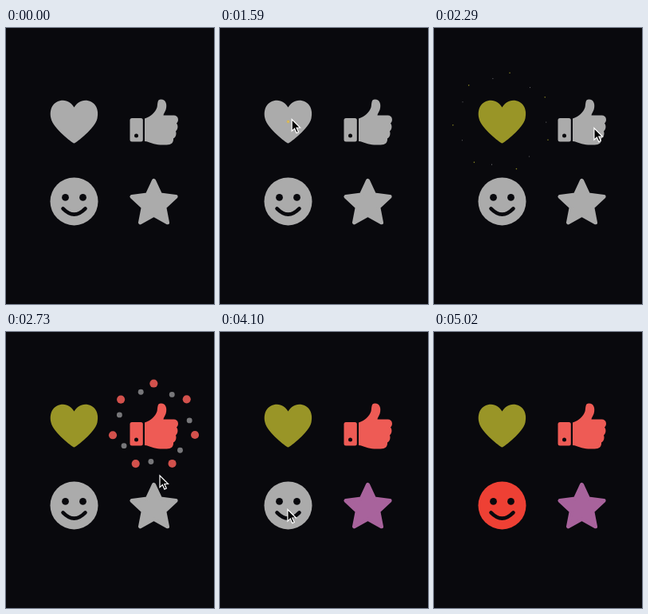
Recreate the animation shown at these times as an HTML page with a canvas. Size 261x346 px, loop 5.4 s.

```html
<!DOCTYPE html>
<html lang="en">
<head>
<meta charset="utf-8">
<title>Reaction icons</title>
<style>
  html, body { margin: 0; width: 100%; height: 100%; overflow: hidden; background: #09090d; }
  canvas { display: block; width: 261px; height: 346px; }
</style>
</head>
<body>
<canvas id="stage"></canvas>
<script>
const W = 261, H = 346, LOOP = 5400, BURST = 835;
const BG = '#09090d', GRAY = '#ababab', TAU = Math.PI * 2;

const canvas = document.getElementById('stage');
const ctx = canvas.getContext('2d');
const dpr = window.devicePixelRatio || 1;
canvas.width = Math.round(W * dpr);
canvas.height = Math.round(H * dpr);

const clamp = v => Math.max(0, Math.min(1, v));
const ramp = (t, from, to) => clamp((t - from) / (to - from));
const easeOut = p => 1 - (1 - p) * (1 - p);

const heartPath = new Path2D('M0 27.2C-3 26-26 8.5-29 -4C-32 -17-25 -26.7-14 -26.7C-8 -26.7-3 -23 0 -18C3 -23 8 -26.7 14 -26.7C25 -26.7 32 -17 29 -4C26 8.5 3 26 0 27.2Z');
const handPath = new Path2D('M-11.5 -4C-4 -6 2 -12 4 -18C5 -23 4 -28 9 -28C15 -28 17 -22 15 -15C14 -12 12 -10 12 -8L25 -8C31 -8 32 -1 28.5 2C31 5 30 10 27.5 12C29 16 27 20 24.5 21C25 26 22 29 16 29L8 29C0 29-5 25-11.5 24.5Z');
const smilePath = new Path2D('M-14 9Q0 23.5 14 9');
const arrowPath = new Path2D('M.5 .5V15.2L3.9 12L6.4 17.6L8.8 16.5L6.4 11H11Z');

const starPath = new Path2D();
for (let i = 0; i < 10; i++) {
  const r = i % 2 ? 14 : 29, a = -Math.PI / 2 + i * Math.PI / 5;
  starPath.lineTo(r * Math.cos(a), 3 + r * Math.sin(a));
}
starPath.closePath();

function dot(x, y, r, color) {
  ctx.fillStyle = color;
  ctx.beginPath();
  ctx.arc(x, y, r, 0, TAU);
  ctx.fill();
}

function drawHeart(color) {
  ctx.fillStyle = color;
  ctx.fill(heartPath);
}

function drawThumb(color) {
  ctx.fillStyle = color;
  ctx.beginPath();
  ctx.roundRect(-30, -4.5, 16.3, 29.5, 2.5);
  ctx.fill();
  ctx.fill(handPath);
  dot(-22, 17.5, 2.5, BG);
}

function drawSmiley(color) {
  dot(0, 0, 30, color);
  dot(-11, -5, 4.4, BG);
  dot(11, -5, 4.4, BG);
  ctx.strokeStyle = BG;
  ctx.lineWidth = 4.6;
  ctx.lineCap = 'round';
  ctx.stroke(smilePath);
}

function drawStar(color) {
  ctx.fillStyle = ctx.strokeStyle = color;
  ctx.lineWidth = 5;
  ctx.lineJoin = 'round';
  ctx.fill(starPath);
  ctx.stroke(starPath);
}

const icons = [
  { x: 85.5, y: 117.4, click: 1590, color: '#999527', draw: drawHeart },
  { x: 185.5, y: 117.4, click: 2420, color: '#ee5b55', draw: drawThumb },
  { x: 185.5, y: 217.4, click: 3260, color: '#a8639c', draw: drawStar },
  { x: 85.5, y: 217.4, click: 4185, color: '#ee4034', draw: drawSmiley }
];

function drawDisc(age) {
  const size = easeOut(ramp(age, 0, 85));
  ctx.globalAlpha = 1 - ramp(age, 103, 248);
  dot(0, 0, 45 * size, '#fff');
  ctx.strokeStyle = '#d6b450';
  ctx.lineWidth = 1.5;
  ctx.stroke();
  ctx.globalAlpha = 1;
}

// Two rings of seven dots drift outward, turn and shrink.
function drawSparks(age, color) {
  const p = easeOut(ramp(age, 150, BURST));
  const alpha = ramp(age, 100, 225);
  for (let i = 0; i < 7; i++) {
    const turn = (16.5 * p + i * 360 / 7) * Math.PI / 180;
    const big = turn - 97 * Math.PI / 180;
    const small = turn - 118 * Math.PI / 180;
    const R = 46 + 16.5 * p, r = 37.5 + 18.5 * p;
    ctx.globalAlpha = alpha * 0.88;
    dot(R * Math.cos(big), R * Math.sin(big), 7.8 * (1 - p) + 0.5, color);
    ctx.globalAlpha = alpha * 0.45;
    dot(r * Math.cos(small), r * Math.sin(small), 5.3 * (1 - p) + 0.35, '#fff');
  }
  ctx.globalAlpha = 1;
}

function drawIcon(icon, t) {
  const age = t - icon.click;
  ctx.save();
  ctx.translate(icon.x, icon.y);
  if (age < 85) {
    icon.draw(GRAY);
  } else {
    const s = clamp(age / 205);
    ctx.save();
    ctx.scale(s, s);
    icon.draw(icon.color);
    ctx.restore();
  }
  if (age > 0 && age < 248) drawDisc(age);
  if (age > 100 && age < BURST) drawSparks(age, icon.color);
  ctx.restore();
}

// Pointer stops: time, x, y
const route = [
  [870, 74, 326], [1230, 89, 114], [1590, 89, 114], [1800, 142, 115],
  [2120, 194, 124], [2290, 200, 125], [2440, 200, 126], [2680, 194, 172],
  [3000, 182, 219], [3230, 180, 224], [3370, 180, 226], [3480, 172, 226],
  [3780, 84, 222], [4350, 84, 222], [4880, 219, 348]
];

function drawPointer(t) {
  const i = route.findIndex(stop => stop[0] > t);
  if (i < 1) return;
  const [t0, x0, y0] = route[i - 1], [t1, x1, y1] = route[i];
  const k = ramp(t, t0, t1);
  ctx.save();
  ctx.translate(x0 + (x1 - x0) * k + 0.4, y0 + (y1 - y0) * k);
  ctx.fillStyle = '#000';
  ctx.strokeStyle = '#fff';
  ctx.lineWidth = 1.2;
  ctx.lineJoin = 'miter';
  ctx.fill(arrowPath);
  ctx.stroke(arrowPath);
  ctx.restore();
}

const start = performance.now();

function frame() {
  const t = (performance.now() - start) % LOOP;
  ctx.setTransform(dpr, 0, 0, dpr, 0, 0);
  ctx.fillStyle = BG;
  ctx.fillRect(0, 0, W, H);
  icons.forEach(icon => drawIcon(icon, t));
  drawPointer(t);
  requestAnimationFrame(frame);
}
frame();
</script>
</body>
</html>
```
